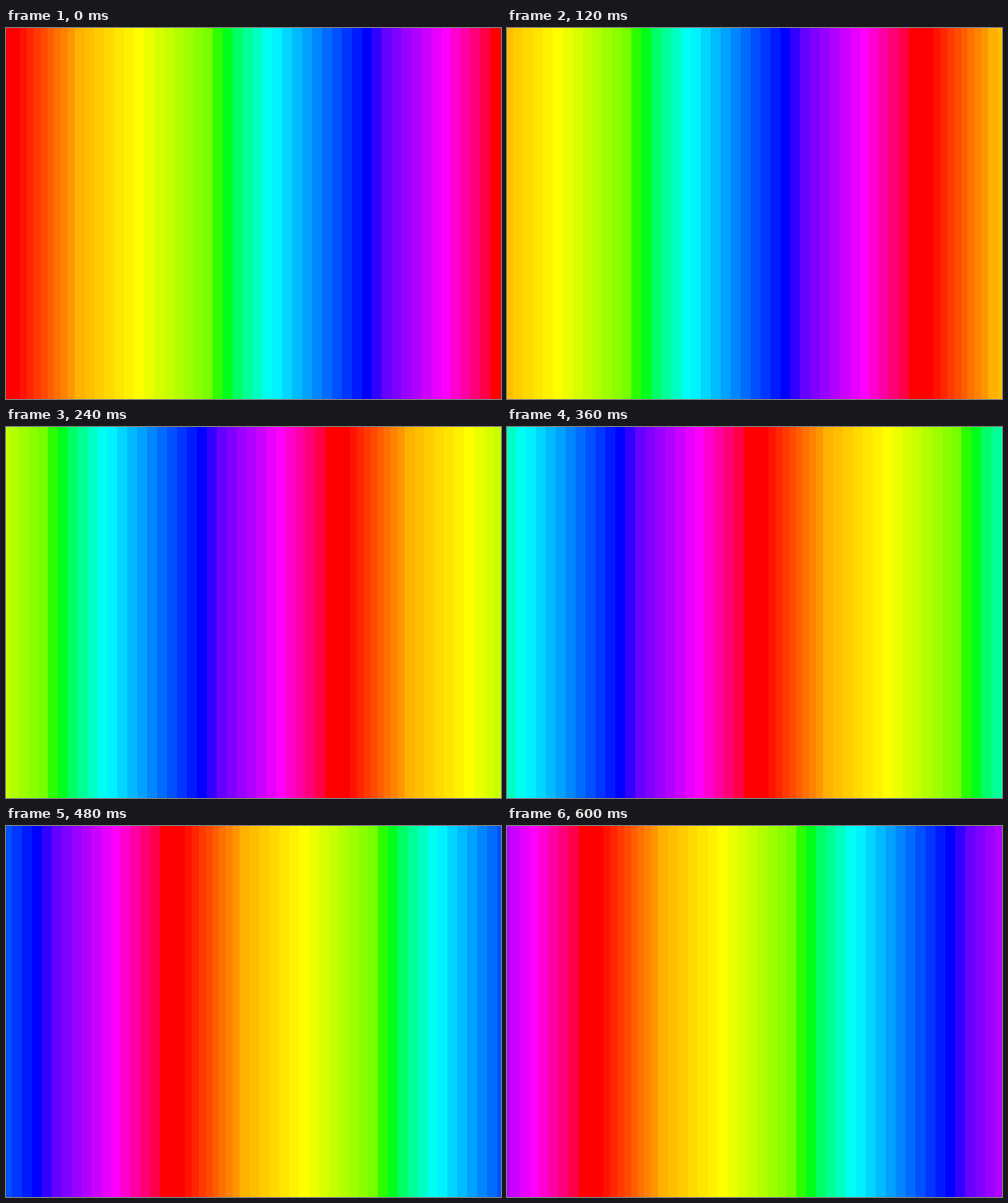
Animation, 498 px wide and 373 px high, one loop 0.66 s. Source, as an HTML page with a canvas:

```html
<!DOCTYPE html>
<html>
<head>
<meta charset="utf-8">
<style>
html, body { margin: 0; width: 100%; height: 100%; overflow: hidden; background: #f00; }
canvas { display: block; }
</style>
</head>
<body>
<canvas id="stage" width="498" height="373"></canvas>
<script>
const W = 498, H = 373;
const STEP_MS = 60, STEPS = 11, SHIFT = W / 12;
const WIDE = W / 50, WIDE_START = 69, WIDE_COUNT = 42;
const NARROW_START = 14, NARROW_COUNT = 8;
const NARROW = (WIDE_START - NARROW_START) / NARROW_COUNT;
const RED_START = WIDE_START + WIDE_COUNT * WIDE - W;
const ctx = document.getElementById('stage').getContext('2d');

// [wide band index, hue]: orange, yellow, green, cyan, blue, magenta, crimson
const keys = [
  [0, 42], [6, 60], [13, 92], [16, 144], [19, 177],
  [29, 240], [31, 264], [37, 300], [41, 343]
];

function hueAt(i) {
  const k = keys.findIndex(key => key[0] >= i);
  if (k === 0) return keys[0][1];
  const [i0, h0] = keys[k - 1], [i1, h1] = keys[k];
  return h0 + (h1 - h0) * (i - i0) / (i1 - i0);
}

// Red wraps round the seam, then narrow bands lead into orange
const bands = [{ x: RED_START, hue: 0 }];
for (let i = 0; i < NARROW_COUNT; i++) {
  bands.push({ x: NARROW_START + i * NARROW, hue: 4.5 + i * 4.4 });
}
for (let i = 0; i < WIDE_COUNT; i++) {
  bands.push({ x: WIDE_START + i * WIDE, hue: hueAt(i) });
}

function drawSpectrum(offset) {
  bands.forEach((band, i) => {
    const end = i + 1 < bands.length ? bands[i + 1].x : RED_START + W;
    const left = Math.round(band.x + offset);
    const right = Math.round(end + offset);
    ctx.fillStyle = `hsl(${band.hue}, 100%, 50%)`;
    ctx.fillRect(left, 0, right - left, H);
  });
}

let shown = -1;
function render(now) {
  const step = Math.floor(now / STEP_MS) % STEPS;
  if (step === shown) return;
  shown = step;
  const offset = -Math.floor(step * SHIFT);
  drawSpectrum(offset);
  drawSpectrum(offset + W);
}

const start = performance.now();
function tick() {
  render(performance.now() - start);
  requestAnimationFrame(tick);
}
tick();
</script>
</body>
</html>
```
